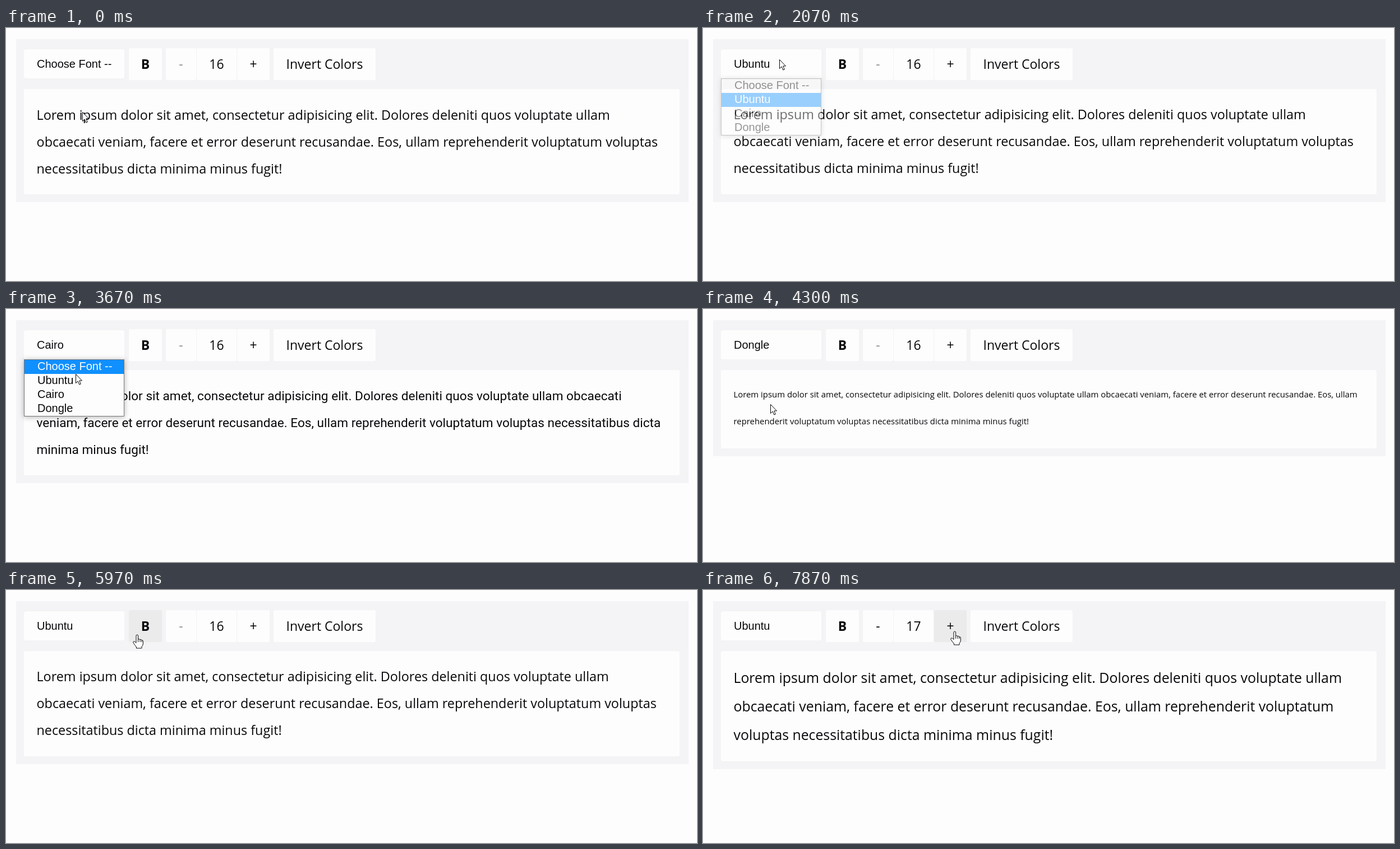
An HTML page for the animation above (8000 ms loop, 1232 by 452 pixels).

```html
<!DOCTYPE html>
<html lang="en">
<head>
<meta charset="utf-8">
<title>Text editor toolbar</title>
<style>
  html, body { margin: 0; width: 100%; height: 100%; overflow: hidden; background: #fdfdfd; }
  svg { display: block; width: 1232px; height: 452px; font: 23px "Open Sans", sans-serif; fill: #08080c; }
  .panel { fill: #f4f3f5; }
  .paper { fill: #fdfdfd; }
  .hover { fill: #ebebec; }
  .mid { text-anchor: middle; }
  .ui { font: 20px "Liberation Sans", Arial, sans-serif; }
  #list { filter: drop-shadow(0 1px 5px rgba(0, 0, 0, .3)); }
  #cursor path { fill: #fdfdfd; stroke: #08080c; stroke-linejoin: round; }
</style>
</head>
<body>
<svg viewBox="0 0 1232 452">
  <rect id="panel" class="panel" x="18" y="20" width="1199"/>
  <rect id="page" class="paper" x="32" y="109" width="1169" rx="3"/>
  <rect class="paper" x="32" y="38" width="179" height="52" rx="4"/>
  <text id="choice" class="ui" x="55" y="71"></text>
  <g id="buttons"></g>
  <g id="copy"></g>
  <g id="list">
    <rect x="32.5" y="90.5" width="178" height="101" fill="#fdfdfd" stroke="#767676"/>
    <rect id="mark" x="33" width="177" height="25" fill="#1090ff"/>
  </g>
  <g id="cursor">
    <path id="arrow" d="M.5.5V16.5L4.2 13 6.8 19 9.3 18 6.8 12H11.5Z"/>
    <path id="hand" d="M-2 2Q-2 0-.2 0 1.6 0 1.6 2V8Q3.4 7 5 8.6 7 7.8 8 9.6 10.4 9.2 10.4 12V16Q10 20 8 21V24H-1.5V22Q-4 19-7 14.5-8 12.5-6 11.8-4.5 11.5-2 14.5ZM1.6 8V13M5 8.6V13M8 9.6V13"/>
  </g>
</svg>
<script>
const LOOP = 8000;
const $ = id => document.getElementById(id);

function add(parent, tag, attrs, text = '') {
  const el = document.createElementNS('http://www.w3.org/2000/svg', tag);
  for (const key in attrs) el.setAttribute(key, attrs[key]);
  el.textContent = text;
  return parent.appendChild(el);
}

const words = ('Lorem ipsum dolor sit amet, consectetur adipisicing elit. Dolores deleniti quos ' +
  'voluptate ullam obcaecati veniam, facere et error deserunt recusandae. Eos, ullam ' +
  'reprehenderit voluptatum voluptas necessitatibus dicta minima minus fugit!').split(' ');
const options = ['Choose Font --', 'Ubuntu', 'Cairo', 'Dongle'];

// breaks: word index at which each following line starts
const sans = '"Open Sans", sans-serif';
const start  = { option: 0, family: sans, size: 23.4, base: 164, breaks: [13, 25] };
const ubuntu = { option: 1, family: sans, size: 23.35, base: 163, breaks: [13, 25] };
const cairo  = { option: 2, family: 'Roboto, sans-serif', size: 22.6, base: 163, breaks: [14, 27] };
const dongle = { option: 3, family: sans, size: 14.9, base: 158, breaks: [22] };
const bold   = { ...ubuntu, weight: 700, size: 22.9, breaks: [13, 24] };
const larger = { ...ubuntu, size: 24.82, base: 165.5, breaks: [13, 24], points: 17 };

const states = [[0, start], [1530, ubuntu], [2900, cairo], [4300, dongle],
  [5600, ubuntu], [6270, bold], [6800, ubuntu], [7800, larger]];
const openings = [[500, 1530], [2070, 2900], [3230, 4300], [4800, 5600]];

// time, x, y of the pointer tip
const path = [[0, 136, 150], [30, 136, 150], [230, 137, 57], [600, 137, 57], [1130, 139, 130],
  [1530, 139, 130], [1930, 136, 56], [2150, 136, 56], [2500, 131, 147], [2900, 131, 147],
  [3070, 129, 57], [3430, 129, 57], [3900, 120, 170], [4300, 120, 170], [4530, 121, 57],
  [4880, 121, 57], [5170, 122, 127], [5600, 122, 127], [6070, 249, 74], [6800, 249, 74],
  [7230, 473, 78], [7400, 473, 78], [7570, 449, 74], [LOOP, 449, 74]];

const buttons = [['B', 219, 59], ['-', 285, 54], ['16', 340, 71], ['+', 412, 58], ['Invert Colors', 477, 182]]
  .map(([label, x, width], i) => ({
    x, width,
    active: i !== 1 && i !== 2,
    box: add($('buttons'), 'rect', { x, y: 36, width, height: 57, rx: 2 }),
    text: add($('buttons'), 'text', { class: 'mid', x: x + width / 2, y: 73 }, label)
  }));
buttons[0].text.setAttribute('font-weight', 700);

const rows = options.map((name, i) =>
  add($('list'), 'text', { class: 'ui', x: 56, y: 109 + 25 * i }, name));

function pointer(t) {
  const i = path.findIndex(p => p[0] > t);
  const [t0, x0, y0] = path[i - 1], [t1, x1, y1] = path[i];
  const p = (t - t0) / (t1 - t0), k = p * p * (3 - 2 * p);
  return [x0 + (x1 - x0) * k, y0 + (y1 - y0) * k];
}

let shown;
function layout(state) {
  if (state === shown) return;
  shown = state;
  const { points = 16, breaks } = state, pitch = points * 3;
  const height = (breaks.length + 1) * pitch + 44;
  $('page').setAttribute('height', height);
  $('panel').setAttribute('height', height + 103);
  $('choice').textContent = options[state.option];
  buttons[2].text.textContent = points;
  buttons[1].text.setAttribute('fill', points > 16 ? '#08080c' : '#8e8e92');
  $('copy').replaceChildren();
  $('copy').style.font = `${state.weight || 400} ${state.size}px ${state.family}`;
  [0, ...breaks].forEach((from, i) => add($('copy'), 'text',
    { x: 54.5, y: state.base + i * pitch }, words.slice(from, breaks[i]).join(' ')));
}

function draw(now) {
  const t = now % LOOP;
  const state = states.findLast(s => s[0] <= t)[1];
  const [x, y] = pointer(t);
  layout(state);

  const open = openings.find(([from, to]) => t >= from && t < to);
  $('list').style.display = open ? '' : 'none';
  if (open) {
    const row = y >= 91 && y < 191 ? Math.floor((y - 91) / 25) : state.option;
    $('list').style.opacity = Math.min(1, .4 + (t - open[0]) / 60);
    $('mark').setAttribute('y', 91 + row * 25);
    rows.forEach((el, i) => el.setAttribute('fill', i === row ? '#fdfdfd' : '#08080c'));
  }

  let over = false;
  for (const b of buttons) {
    const hit = b.active && x >= b.x && x < b.x + b.width && y >= 36 && y < 93;
    b.box.setAttribute('class', hit ? 'hover' : 'paper');
    over = over || hit;
  }
  $('hand').style.display = over ? '' : 'none';
  $('arrow').style.display = over ? 'none' : '';
  $('cursor').setAttribute('transform', `translate(${Math.round(x)} ${Math.round(y)})`);
}

function tick() {
  draw(performance.now());
  requestAnimationFrame(tick);
}
tick();
</script>
</body>
</html>
```
